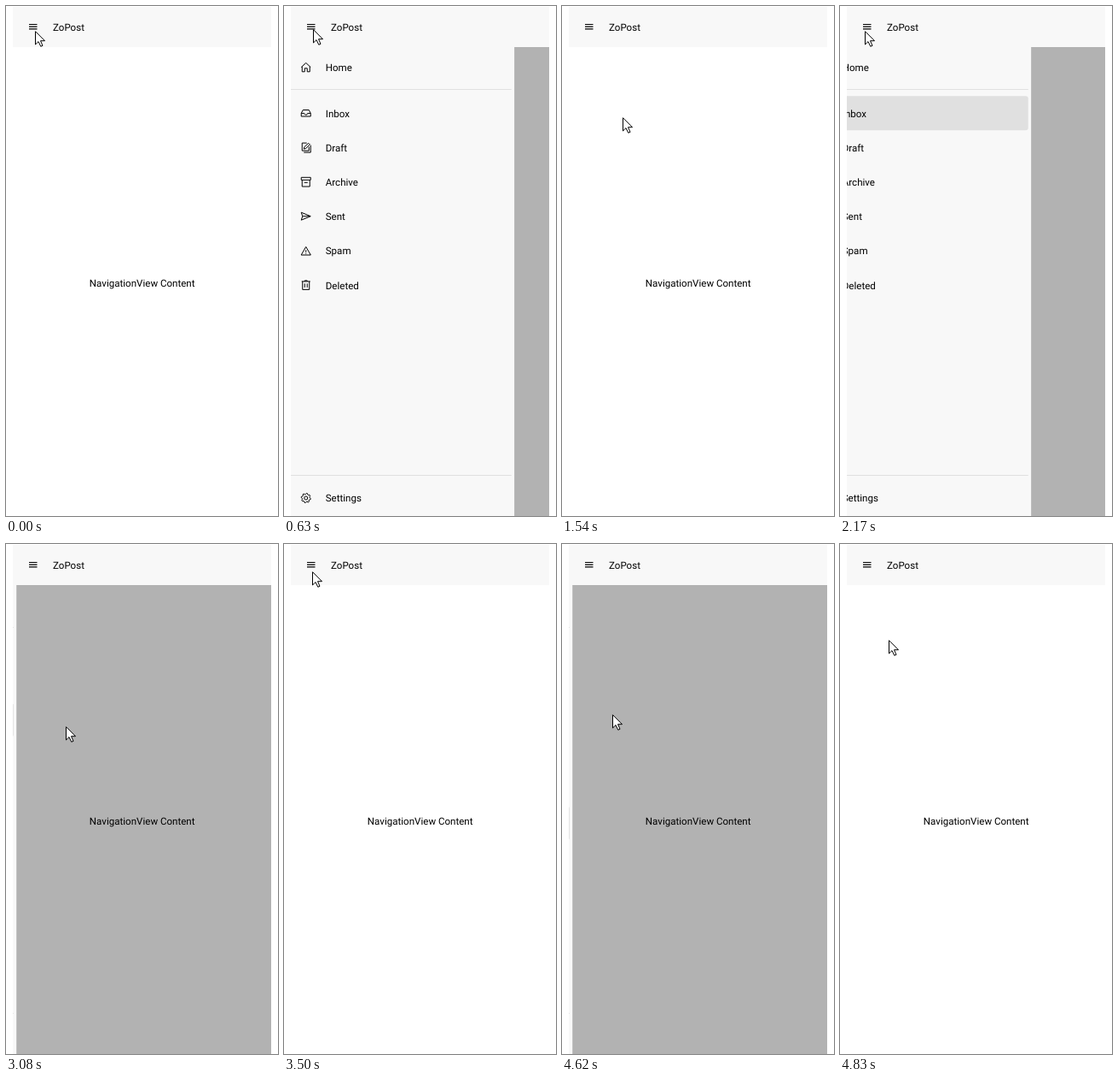
These frames come from a looping animation (319x596 px, 5.6 s). An HTML page:

```html
<!DOCTYPE html>
<html lang="en">
<head>
<meta charset="utf-8">
<title>Navigation drawer</title>
<style>
  html, body { margin: 0; width: 100%; height: 100%; overflow: hidden; background: #fff; }
  svg { display: block; }
  text { font: 11.57px Roboto, sans-serif; text-rendering: geometricPrecision; }
  .icon { fill: none; stroke: #000; stroke-linejoin: round; }
  .rule { stroke: #e0e0e0; }
</style>
</head>
<body>
<svg width="319" height="596" viewBox="0 0 319 596">
  <text x="159.7" y="328" text-anchor="middle">NavigationView Content</text>
  <svg id="pane" x="8" y="48" width="303" height="548" viewBox="8 48 303 548">
    <path fill-opacity=".3" d="M8 48H311V596H8Z"/>
    <g id="drawer">
      <path fill="#f8f8f8" d="M8 48H276.4V596H8Z"/>
      <path class="rule" d="M12 97.5H273M12 548.5H273"/>
      <rect id="mark" x="12" width="261" height="40" rx="3" fill="#e0e0e0"/>
    </g>
  </svg>
  <path fill="#f8f8f8" d="M8 1H311V48H8Z"/>
  <path class="icon" stroke-width="1.2" d="M27 21.5h9.5M27 24.2h9.5M27 26.9h9.5"/>
  <text x="55" y="29">ZoPost</text>
  <path id="cursor" fill="#fff" stroke="#000" d="M.5 .7V16L4 12.6l2.8 5.7 2.2-1L6.5 11.7h5Z"/>
</svg>
<script>
const $ = id => document.getElementById(id);
const LOOP = 5600, STEP = 70, WIDTH = 268.4;

const gear = 'M' + Array.from({ length: 32 }, (_, i) => {
  const a = (i + .5) * Math.PI / 16, r = i % 4 < 2 ? 5.6 : 4.4;
  return (r * Math.cos(a)).toFixed(2) + ' ' + (r * Math.sin(a)).toFixed(2);
}).join('L') + 'ZM2 0A2 2 0 1 1-2 0A2 2 0 1 1 2 0';

const folders = [
  ['Inbox', 'M-5.5 0L-3.5-3.9H3.5L5.5 0V3.6H-5.5ZM-5.5 0H-2Q-1.6 1.8 0 1.8T2 0H5.5'],
  ['Draft', 'M1-5.5H-4.5V3.5H3.5V-1M-2.5 5.5H5.5V-3M-2.5 1.5L-1.8-1 3-5.3 4.6-3.7 0 .8Z'],
  ['Archive', 'M-5.5-5.5H5.5V-2.5H-5.5ZM-4.5-2.5V5.2H4.5V-2.5M-2 .5H2'],
  ['Sent', 'M-5.5-4.8L5.5-.3-5.5 4.2-4-.3ZM-4-.3H5'],
  ['Spam', 'M0-4.8L5.6 4.8H-5.6ZM0-1V1.5M0 2.5V3.5'],
  ['Deleted', 'M-5-4.5H5M-1.5-4.5V-5.5H1.5V-4.5M-4-4.5V5H4V-4.5M-1.5-2V2.5M1.5-2V2.5']
];
const folderY = i => 125.4 + 40.2 * i;

function addItem(label, y, icon) {
  $('drawer').insertAdjacentHTML('beforeend',
    `<path class="icon" transform="translate(32 ${y})" d="${icon}"/><text x="55" y="${y + 4.2}">${label}</text>`);
}
addItem('Home', 71.8, 'M-5.5-.3L0-5.3 5.5-.3M-4.5-1V5H-1.5V1H1.5V5H4.5V-1');
folders.forEach(([label, icon], i) => addItem(label, folderY(i), icon));
addItem('Settings', 575, gear);

// Each visit: press the menu button, go towards a folder, settle on it and pick it.
const visits = [
  { open: 560, go: 770, shut: 1470, pick: 0, button: [34, 27], near: [71, 143], aim: [71, 130] },
  { open: 2170, go: 2240, shut: 3080, pick: 2, button: [29, 29], near: [66, 225], aim: [70, 213] },
  { open: 3850, go: 3850, shut: 4620, pick: 5, button: [33, 25], near: [72, 325], aim: [72, 318] }
];
const home = [34, 29], rest = [57, 112];

const glides = visits.flatMap(({ go, shut, button, near, aim }, i) => [
  { from: i ? visits[i - 1].shut + 140 : 0, span: 420, to: button },
  { from: go, span: 350, to: near },
  { from: shut - 420, span: 210, to: aim }
]);
glides.push({ from: 4550, span: 280, to: rest });

// Sideways motion settles sooner than vertical motion.
function cursorAt(t) {
  let [x, y] = home;
  for (const { from, span, to } of glides) {
    const left = 1 - Math.min(1, Math.max(0, (t - from) / span));
    x = to[0] + (x - to[0]) * left ** 7;
    y = to[1] + (y - to[1]) * left ** 3;
  }
  return [Math.round(x), Math.round(y)];
}

// Shift of the drawer, from -WIDTH (hidden) to 0 (open).
function slideAt(t) {
  const decay = age => Math.exp(-age / 33);
  const visit = visits.find(v => t >= v.open && t < v.shut + STEP);
  if (!visit) return -WIDTH;
  const { open, shut } = visit;
  return -WIDTH * (t < shut ? decay(t - open + 54) : 1 - decay(t - shut + 137));
}

function draw(now) {
  const t = Math.floor(now % LOOP / STEP) * STEP;
  const slide = slideAt(t), picked = visits.findLast(v => t >= v.shut);
  $('pane').style.display = slide === -WIDTH ? 'none' : '';
  $('drawer').setAttribute('transform', `translate(${slide.toFixed(2)} 0)`);
  $('mark').style.display = picked ? '' : 'none';
  if (picked) $('mark').setAttribute('y', folderY(picked.pick) - 20.2);
  $('cursor').setAttribute('transform', `translate(${cursorAt(t).join(' ')})`);
}

const start = performance.now();
function tick() {
  draw(performance.now() - start);
  requestAnimationFrame(tick);
}
tick();
</script>
</body>
</html>
```
